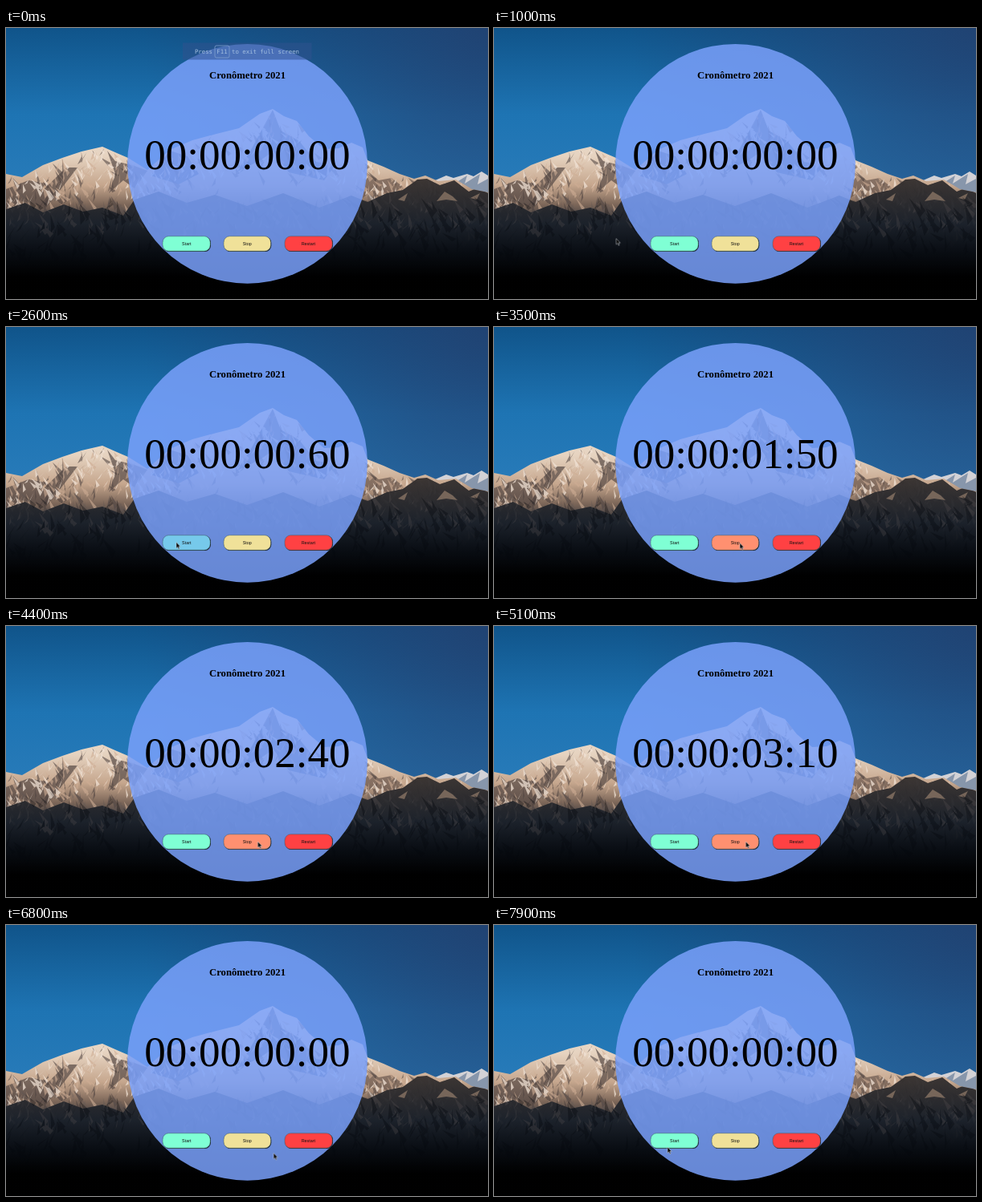
An HTML page for the animation above (8 s loop, 600 px wide and 338 px high).

```html
<!DOCTYPE html>
<html lang="pt">
<head>
<meta charset="utf-8">
<title>Cronômetro</title>
<style>
html, body { margin: 0; width: 100%; height: 100%; overflow: hidden; background: #000; }
svg { display: block; width: 600px; height: 338px; }
text { text-anchor: middle; }
.title { font: bold 12.7px "Liberation Serif", serif; }
.clock { font: 53px "Liberation Serif", serif; }
.button text { font: 5.4px "Liberation Sans", sans-serif; fill: #111; }
.button rect { stroke: #3c5a66; stroke-width: .5; }
.button .edge { fill: #18202a; stroke: none; }
.toast text { font: 7.35px "DejaVu Sans Mono", monospace; fill: #a3bfe0; }
.toast, .cursor, .face { animation: 8s linear infinite; }
.toast { animation-name: toast; }
.cursor { animation-name: move; }
.face { animation-timing-function: step-end; }
#start .face { fill: #7fffd4; animation-name: startHover; }
#stop .face { fill: #f0e199; animation-name: stopHover; }
#restart .face { fill: #ff4143; animation-name: restartHover; }
@keyframes toast { 0% { opacity: 1; } 4%, 100% { opacity: 0; } }
@keyframes move {
  0%, 6.2% { transform: translate(96px, 288px); opacity: 0; }
  6.25% { transform: translate(96px, 288px); opacity: 1; }
  12.5% { transform: translate(152px, 262.5px); }
  22%, 33% { transform: translate(212px, 268.5px); }
  38% { transform: translate(262px, 286px); }
  43.75% { transform: translate(306px, 269.5px); }
  55%, 65% { transform: translate(313.5px, 269px); }
  71%, 77% { transform: translate(369px, 270px); }
  84% { transform: translate(345px, 284px); }
  93% { transform: translate(240px, 288px); }
  98.75%, 100% { transform: translate(216px, 277px); opacity: 1; }
}
@keyframes startHover { 20% { fill: #76c9eb; } 35.2% { fill: #7fffd4; } }
@keyframes stopHover { 41.5% { fill: #ff9070; } 67% { fill: #f0e199; } }
@keyframes restartHover { 69% { fill: #ef4360; } 80.5% { fill: #ff4143; } }
</style>
</head>
<body>
<svg viewBox="0 0 600 338">
  <defs>
    <linearGradient id="sky" x2="0" y2="1">
      <stop offset="0" stop-color="#10548a"/>
      <stop offset=".5" stop-color="#1e74b3"/>
      <stop offset="1" stop-color="#2a7cba"/>
    </linearGradient>
    <radialGradient id="dusk" gradientUnits="userSpaceOnUse" cx="600" cy="0" r="430">
      <stop offset="0" stop-color="#23406f" stop-opacity=".85"/>
      <stop offset="1" stop-color="#23406f" stop-opacity="0"/>
    </radialGradient>
    <linearGradient id="rock" gradientUnits="userSpaceOnUse" x1="0" y1="100" x2="0" y2="300">
      <stop offset="0" stop-color="#f0e4d8"/>
      <stop offset=".3" stop-color="#e6d3c0"/>
      <stop offset=".48" stop-color="#c5a68d"/>
      <stop offset=".6" stop-color="#7d6759"/>
      <stop offset=".72" stop-color="#2d3038"/>
      <stop offset="1" stop-color="#030508"/>
    </linearGradient>
    <linearGradient id="front" gradientUnits="userSpaceOnUse" x1="0" y1="190" x2="0" y2="310">
      <stop offset="0" stop-color="#35302f"/>
      <stop offset=".45" stop-color="#1b212a"/>
      <stop offset=".75" stop-color="#080c12"/>
      <stop offset="1" stop-color="#000"/>
    </linearGradient>
    <clipPath id="inside"><path id="clipRidge"/></clipPath>
  </defs>

  <rect width="600" height="215" fill="url(#sky)"/>
  <rect width="600" height="215" fill="url(#dusk)"/>
  <path d="M525 194L548 184 557 187 574 182 582 185 592 179 600 184V215H525Z" fill="#d3d2d6"/>
  <path d="M555 196L574 184 571 194 590 182 587 195 600 188V215H555Z" fill="#8796ab"/>
  <path id="ridge" fill="url(#rock)"/>
  <g clip-path="url(#inside)">
    <path d="M0 201L28 190 50 194 40 208 75 174 89 174 66 204 50 224 20 216 0 226ZM126 153L136 166 160 172 176 178 160 200 146 190 128 206 136 182Z" fill="#584a46" opacity=".7"/>
    <path d="M332 102L342 128 365 141 386 167 410 171 396 190 352 180 333 154 315 166 288 179 306 150ZM204 153L226 160 240 182 215 195 180 184Z" fill="#4b566a" opacity=".75"/>
    <path d="M448 180L464 190 480 187 494 198 478 208 458 200 444 212Z" fill="#5a4a44" opacity=".6"/>
    <g id="facets"/>
    <path d="M0 226L24 218 46 230 72 220 96 229 120 224 146 234 160 214 190 204 225 218 260 208 300 222 345 206 390 224 430 209 450 217 474 206 494 202 512 189 524 188 540 196 558 190 576 204 588 199 600 206V338H0Z" fill="url(#front)" opacity=".96"/>
    <path d="M536 216L546 204 556 210 562 216 548 214ZM488 214L500 206 496 216ZM578 212L590 206 586 214Z" fill="#a58a76" opacity=".6"/>
    <g id="scree" opacity=".35"/>
  </g>

  <circle cx="300.5" cy="169.3" r="149.4" fill="#7aa0fb" fill-opacity=".85"/>
  <text class="title" x="300.5" y="63">Cronômetro 2021</text>
  <text class="clock" id="clock" x="300.3" y="176.3">00:00:00:00</text>

  <g class="button" id="start" transform="translate(195 259.7)">
    <rect class="edge" x=".5" y=".5" width="59.5" height="18.8" rx="7.5"/>
    <rect class="face" width="59.2" height="18.5" rx="7.5"/>
    <text x="29.8" y="11.4">Start</text>
  </g>
  <g class="button" id="stop" transform="translate(271 259.7)">
    <rect class="edge" x=".5" y=".5" width="58.8" height="18.8" rx="7.5"/>
    <rect class="face" width="58.5" height="18.5" rx="7.5"/>
    <text x="29.3" y="11.4">Stop</text>
  </g>
  <g class="button" id="restart" transform="translate(347 259.7)">
    <rect class="edge" x=".5" y=".5" width="59.5" height="18.8" rx="7.5"/>
    <rect class="face" width="59.2" height="18.5" rx="7.5"/>
    <text x="29.4" y="11.4">Restart</text>
  </g>

  <g class="toast">
    <rect x="220" y="18.5" width="160.5" height="21" fill="#31528f" opacity=".55"/>
    <rect x="260" y="22" width="18" height="15" rx="2" fill="none" stroke="#7f9fce" stroke-width=".8"/>
    <text x="246" y="32">Press</text>
    <text x="269" y="32">F11</text>
    <text x="323" y="32">to exit full screen</text>
  </g>
  <path class="cursor" d="M0 0V7.4L1.7 5.9 2.9 8.6 4.1 8.1 2.9 5.4H5.2Z" fill="#080808" stroke="#d5dae0" stroke-width=".5"/>
</svg>
<script>
const $ = id => document.getElementById(id);
const points = [[0, 182], [20, 186], [46, 171], [70, 162], [94, 154], [120, 148], [138, 156],
  [152, 162], [176, 177], [204, 152], [232, 140], [262, 132], [290, 125], [316, 107], [332, 101],
  [346, 110], [362, 116], [377, 135], [396, 151], [414, 150], [430, 143], [444, 149], [450, 165],
  [470, 173], [490, 182], [508, 188], [522, 184], [538, 191], [560, 189], [580, 201], [600, 205]];
const outline = "M" + points.join("L") + "V338H0Z";
$("ridge").setAttribute("d", outline);
$("clipRidge").setAttribute("d", outline);

let seed = 21;
const random = () => (seed = seed * 16807 % 2147483647) / 2147483647;

function ridgeY(x) {
  const i = Math.max(1, points.findIndex(p => p[0] >= x));
  const [x0, y0] = points[i - 1], [x1, y1] = points[i];
  return y0 + (y1 - y0) * (x - x0) / (x1 - x0);
}

// Slanted rock slivers scattered below the ridge line.
function scatter(parent, color, count, place, size, opacity) {
  let d = "";
  for (let i = 0; i < count; i++) {
    const x = random() * 599, y = place(x);
    const lean = (random() - .5) * size * 1.6, drop = size * (.5 + random());
    const w = 1 + random() * size * .3;
    d += `M${x} ${y}l${lean} ${drop} ${w} ${-drop * .3}Z`;
  }
  const path = document.createElementNS("http://www.w3.org/2000/svg", "path");
  path.setAttribute("d", d);
  path.setAttribute("fill", color);
  path.setAttribute("opacity", opacity);
  $(parent).append(path);
}
const nearRidge = depth => x => ridgeY(x) + random() * depth;
scatter("facets", "#4a3f3c", 240, nearRidge(70), 13, .55);
scatter("facets", "#f0e2d4", 300, nearRidge(42), 11, .75);
scatter("facets", "#cfae94", 260, nearRidge(60), 12, .6);
scatter("scree", "#5b5454", 200, () => 204 + random() * 42, 13, .8);
scatter("scree", "#05080d", 220, () => 210 + random() * 65, 18, 1);

const pad = n => String(n).padStart(2, "0");
function tick() {
  const t = Math.floor((performance.now() % 8000 + 15) / 100) * 100;
  const run = t < 6000 ? Math.min(Math.max(t - 2000, 0), 3200) : 0;
  $("clock").textContent = `00:00:${pad(Math.floor(run / 1000))}:${pad(run % 1000 / 10)}`;
  requestAnimationFrame(tick);
}
tick();
</script>
</body>
</html>
```
